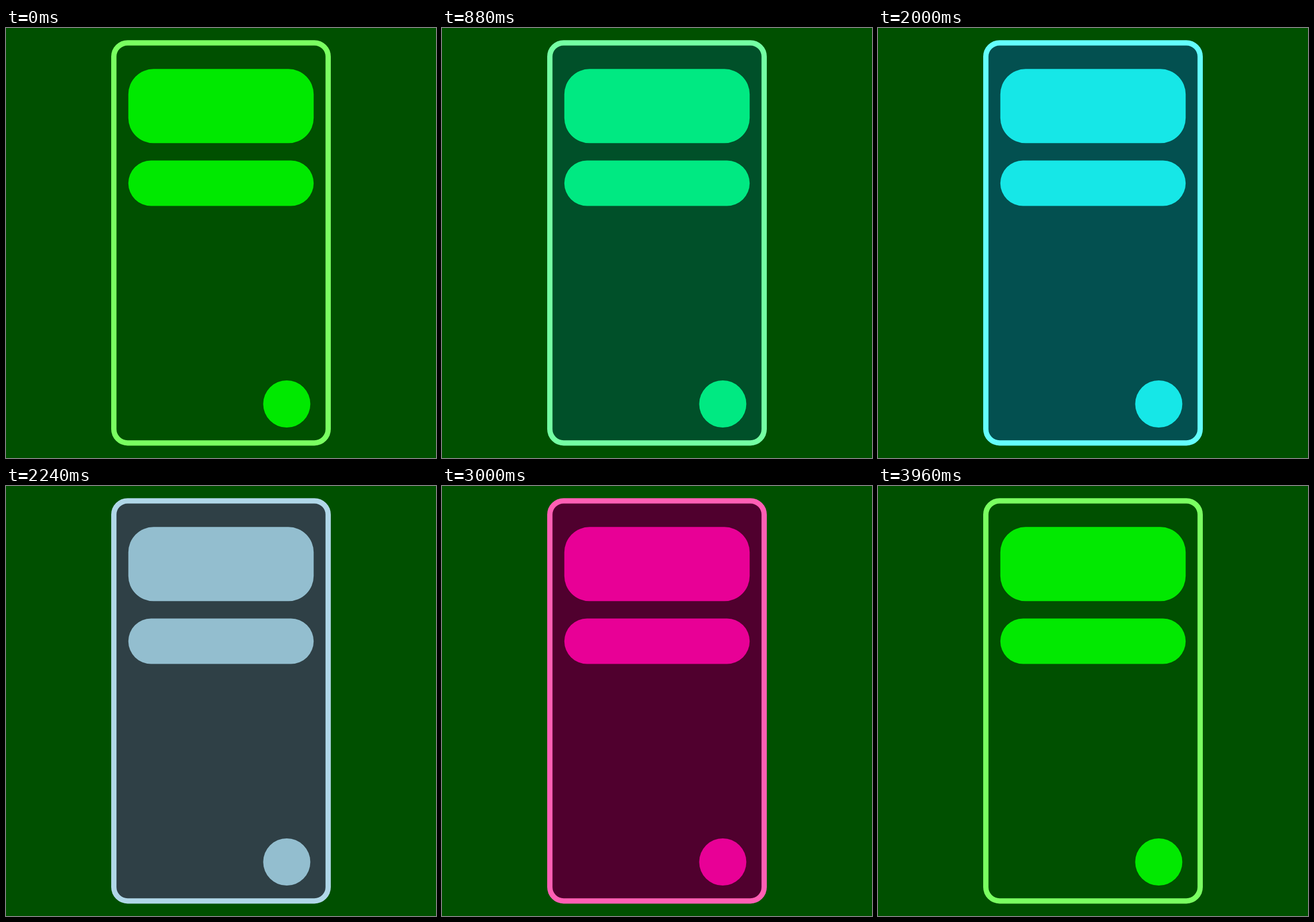
An HTML page with a canvas that plays this animation: 748x748 px, repeating every 4 s.

```html
<!DOCTYPE html>
<html lang="en">
<head>
<meta charset="utf-8">
<title>Colour themes</title>
<style>
html, body { margin: 0; width: 100%; height: 100%; overflow: hidden; background: #005000; }
canvas { display: block; width: 748px; height: 748px; }
</style>
</head>
<body>
<canvas id="stage" width="748" height="748"></canvas>
<script>
const ctx = document.getElementById("stage").getContext("2d");

const LOOP = 4000, STEP = 40, FADE = 690;

// Each theme begins to fade in at its start time.
const themes = [
  { start: -720, panel: [0, 80, 0], edge: [122, 255, 97], fill: [0, 233, 0] },
  { start: 640, panel: [0, 80, 80], edge: [97, 255, 255], fill: [0, 232, 232] },
  { start: 1960, panel: [80, 0, 46], edge: [255, 95, 180], fill: [232, 0, 150] },
  { start: 3280, panel: [0, 80, 0], edge: [122, 255, 97], fill: [0, 233, 0] }
];

const toLinear = v => {
  v /= 255;
  return v <= 0.04045 ? v / 12.92 : ((v + 0.055) / 1.055) ** 2.4;
};
const toByte = v =>
  Math.round(255 * (v <= 0.0031308 ? v * 12.92 : 1.055 * v ** (1 / 2.4) - 0.055));

// Blend two colours in linear light.
function mix(a, b, k) {
  const rgb = a.map((v, i) => toByte(toLinear(v) * (1 - k) + toLinear(b[i]) * k));
  return `rgb(${rgb.join(",")})`;
}

const smooth = p => p * p * (3 - 2 * p);

function box(x, y, w, h, r) {
  ctx.beginPath();
  ctx.roundRect(x, y, w, h, r);
}

function draw(t) {
  let i = themes.length - 1;
  while (i > 0 && t < themes[i].start) i--;
  const to = themes[i], from = themes[Math.max(0, i - 1)];
  const k = smooth(Math.min(1, Math.max(0, (t - to.start) / FADE)));
  const color = part => mix(from[part], to[part], k);

  ctx.fillStyle = "#005000";
  ctx.fillRect(0, 0, 748, 748);

  box(187.6, 25.8, 372.8, 696, 24);
  ctx.fillStyle = color("panel");
  ctx.fill();
  ctx.lineWidth = 9.2;
  ctx.strokeStyle = color("edge");
  ctx.stroke();

  ctx.fillStyle = color("fill");
  box(212.8, 71.3, 322.4, 129, 44);
  ctx.fill();
  box(212.8, 230.5, 322.4, 79, 39.5);
  ctx.fill();
  ctx.beginPath();
  ctx.arc(488.4, 654, 41, 0, Math.PI * 2);
  ctx.fill();
}

const begin = performance.now();

function tick() {
  const t = (performance.now() - begin) % LOOP;
  draw(Math.floor(t / STEP) * STEP);
  requestAnimationFrame(tick);
}
tick();
</script>
</body>
</html>
```
